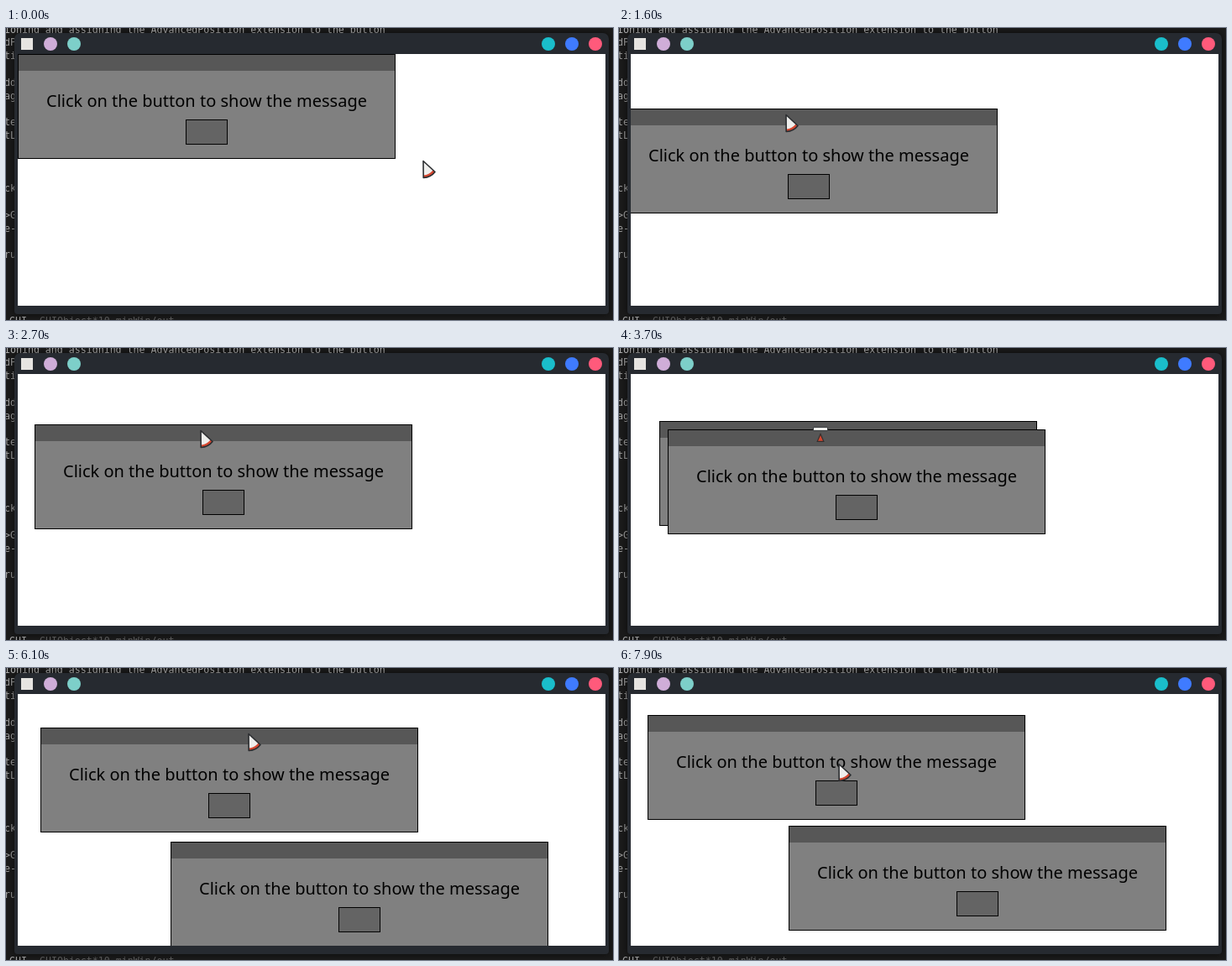
An HTML page with a canvas that plays this animation: 723x348 px, repeating every 8000 ms.

```html
<!DOCTYPE html>
<html lang="en">
<head>
<meta charset="utf-8">
<title>Draggable message windows</title>
<style>
  html, body { margin: 0; width: 100%; height: 100%; overflow: hidden; background: #1b1b1b; }
  canvas { display: block; }
</style>
</head>
<body>
<canvas id="stage" width="723" height="348"></canvas>
<script>
const ctx = document.getElementById("stage").getContext("2d");
const STEP = 100, STEPS = 80;

// Tracks hold [step, x, y] keys; one step is 100 ms.
const panelA = [
  [9, 14, 31], [10, 20, 36], [11, 32, 46], [12, 30, 56], [13, 16, 60], [14, 2, 66], [15, -6, 80],
  [16, 1, 96], [17, 50, 111], [18, 97, 104], [19, 86, 82], [20, 54, 71], [21, 23, 69],
  [22, 4, 88], [23, -4, 118], [24, 8, 142], [25, 26, 134], [26, 32, 110], [27, 34, 91],
  [28, 42, 89], [29, 48, 87], [59, 48, 87], [60, 45, 79], [61, 41, 71], [62, 38, 64], [64, 34, 56]
];
const panelB = [
  [44, 58, 97], [45, 70, 102], [47, 124, 124], [49, 186, 147], [51, 216, 164], [52, 208, 188],
  [53, 196, 207], [67, 196, 207], [68, 195, 202], [70, 194, 186], [72, 198, 176], [74, 202, 188]
];
const pointer = [
  [0, 496, 157], [2, 446, 131], [4, 360, 88], [6, 268, 48], [8, 205, 31], [9, 211, 37],
  [38, 245, 93], [39, 246, 97], [43, 249, 109],
  [55, 387, 219], [57, 345, 158], [59, 295, 93],
  [64, 281, 64], [65, 340, 160], [66, 388, 230], [67, 388, 230], [68, 382, 213],
  [76, 389, 199], [77, 350, 172], [78, 302, 138], [79, 261, 113]
];
// While a panel is held, the pointer keeps this offset: [from, to, track, dx, dy].
const drags = [
  [9, 37, panelA, 197, 6], [43, 55, panelB, 191, 14],
  [59, 64, panelA, 247, 6], [68, 75, panelB, 187, 11]
];

function at(track, n) {
  const i = track.findIndex(k => k[0] >= n);
  if (i < 0) return track[track.length - 1].slice(1);
  if (i === 0) return track[0].slice(1);
  const a = track[i - 1], b = track[i], u = (n - a[0]) / (b[0] - a[0]);
  return [1, 2].map(j => Math.round(a[j] + (b[j] - a[j]) * u));
}

function pointerAt(n) {
  const drag = drags.find(d => n >= d[0] && n <= d[1]);
  if (!drag) return at(pointer, n);
  const [x, y] = at(drag[2], n);
  return [x + drag[3], y + drag[4]];
}

function rect(x, y, w, h, fill) {
  ctx.fillStyle = fill;
  ctx.fillRect(x, y, w, h);
}

function box(x, y, w, h, fill) {
  rect(x, y, w, h, "#000");
  rect(x + 1, y + 1, w - 2, h - 2, fill);
}

function disc(x, fill) {
  ctx.fillStyle = fill;
  ctx.beginPath();
  ctx.arc(x, 19, 8, 0, 7);
  ctx.fill();
}

function label(text, x, y, fill) {
  ctx.fillStyle = fill;
  ctx.fillText(text, x, y);
}

function terminal() {
  rect(0, 0, 723, 348, "#1b1b1b");
  ctx.font = '11.6px "DejaVu Sans Mono", monospace';
  label("ioning and assigning the AdvancedPosition extension to the button", -2, 6, "#b4b4b4");
  const scraps = { 1: "dP", 2: "ti", 4: "dd", 5: "ag", 7: "te", 8: "tL", 12: "ck", 14: ">G", 15: "e-", 17: "ru" };
  for (const row in scraps) label(scraps[row], -2, 5.5 + row * 15.8, "#a0a0a0");
  label("GUI", 4, 353, "#a8a8a8");
  label("- GUIObject*10 minWin/out", 26, 353, "#606060");
}

function frame() {
  ctx.save();
  ctx.shadowColor = "rgba(0,0,0,.6)";
  ctx.shadowBlur = 9;
  ctx.fillStyle = "#262a30";
  ctx.beginPath();
  ctx.roundRect(10, 6, 708, 335, [7, 7, 4, 4]);
  ctx.fill();
  ctx.restore();
  rect(18, 12, 14, 14, "#e6e4e1");
  disc(53, "#cfadd8");
  disc(81, "#7dcfc9");
  disc(646, "#1abecb");
  disc(674, "#3f7bff");
  disc(702, "#ff5a7b");
  rect(14, 31, 700, 300, "#fff");
}

function panel([x, y]) {
  box(x, y, 450, 125, "#808080");
  rect(x + 1, y + 1, 448, 19, "#575757");
  ctx.font = '20px "Noto Sans", sans-serif';
  label("Click on the button to show the message", x + 34, y + 63, "#000");
  box(x + 200, y + 78, 50, 30, "#646464");
}

function shape(path, fill, line, width) {
  const p = new Path2D(path);
  if (fill) {
    ctx.fillStyle = fill;
    ctx.fill(p);
  }
  if (line) {
    ctx.strokeStyle = line;
    ctx.lineWidth = width;
    ctx.stroke(p);
  }
}

function arrow([x, y]) {
  ctx.save();
  ctx.translate(x, y);
  ctx.lineJoin = "round";
  shape("M1 1.5L15 14.5Q10 21 1.2 21.5Z", "#eeeeec");
  shape("M1.5 18.5Q8 18 12.5 12.5L15 14.5Q10 21 1.2 21.5Z", "#d4462f");
  shape("M1 1.5L15 14.5Q10 21 1.2 21.5Z", null, "#2b2d30", 1.6);
  ctx.restore();
}

function pressed() {
  shape("M231.5 94.5H248.5V98.5H231.5Z", "#eeeeea", "#3a3d40", 1);
  shape("M240 102.5L243.8 111.3H236.2Z", "#d4462f", "#33302f", 1.2);
}

function draw(now) {
  const n = Math.floor(now / STEP) % STEPS;
  terminal();
  frame();
  ctx.save();
  ctx.beginPath();
  ctx.rect(14, 31, 700, 300);
  ctx.clip();
  panel(at(panelA, n));
  if (n >= 37) panel(at(panelB, n));
  ctx.restore();
  if (n === 37 || n === 38) pressed();
  else arrow(pointerAt(n));
}

const start = performance.now();
function tick() {
  draw(performance.now() - start);
  requestAnimationFrame(tick);
}
tick();
</script>
</body>
</html>
```
